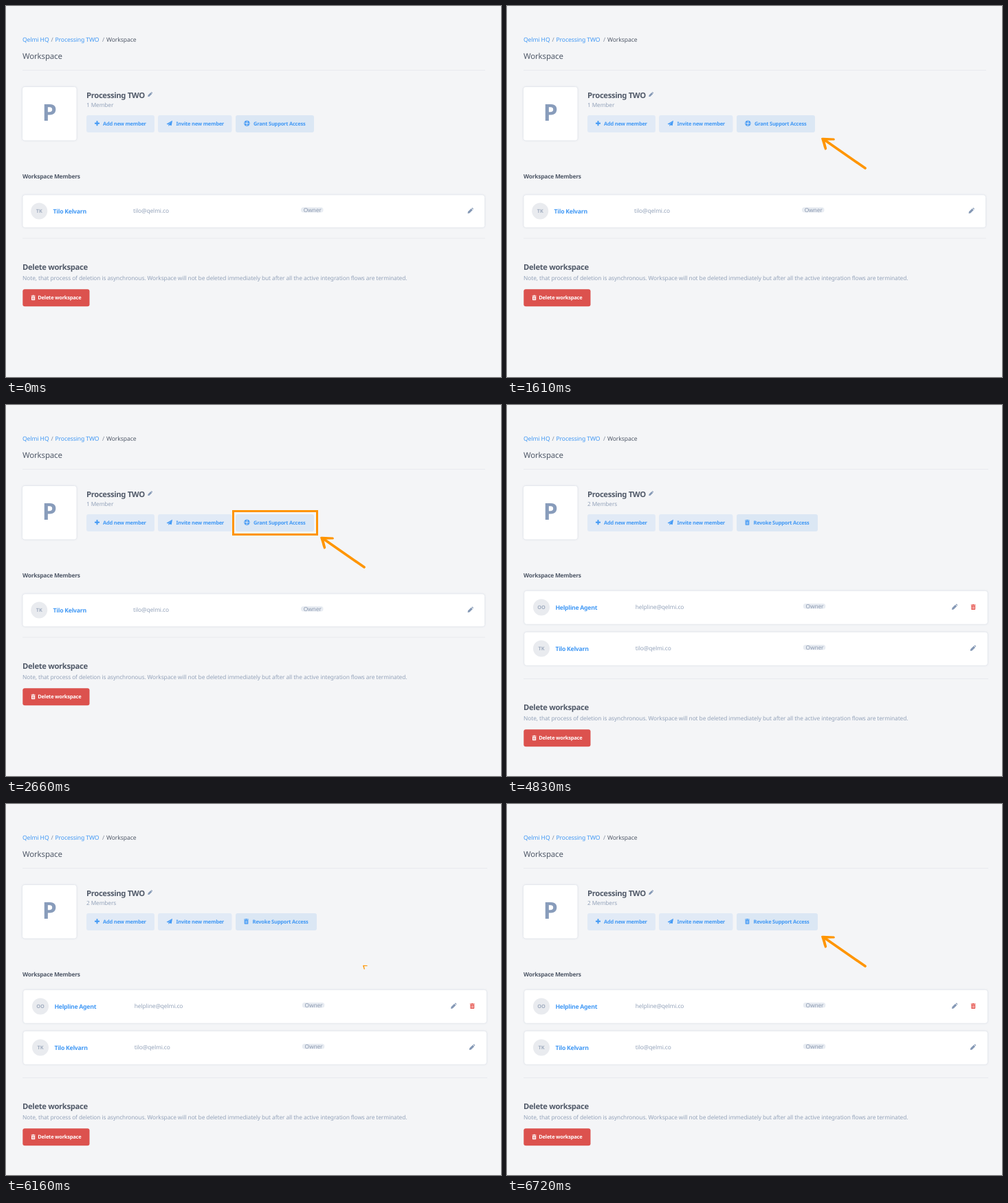
Write an HTML page that moves like this. It is 720 by 540 pixels and loops after 8000 ms.

```html
<!DOCTYPE html>
<html lang="en">
<head>
<meta charset="utf-8">
<title>Workspace settings</title>
<style>
  html, body { margin: 0; width: 100%; height: 100%; overflow: hidden; background: #f4f5f7; }
  svg { display: block; width: 100vw; height: 100vh; }
  text {
    font: 8.4px "Noto Sans", "Open Sans", sans-serif;
    letter-spacing: -.0125em;
    text-rendering: geometricPrecision;
    fill: #515a69;
  }
  .bold { font-weight: 700; letter-spacing: -.03em; }
  .crumb { font-size: 8.6px; }
  .title { font-size: 11.45px; }
  .head { font-size: 11.25px; }
  .sub { font-size: 8.45px; }
  .name { font-size: 8.7px; }
  .btn { font-size: 7.5px; }
  .count { font-size: 8.3px; }
  .note { font-size: 8px; fill: #b4b8bd; }
  .initials { font-size: 7.3px; letter-spacing: 0; text-anchor: middle; fill: #a0acbf; }
  .letter { font-size: 33.6px; letter-spacing: 0; text-anchor: middle; fill: #889cbb; }
  .link { fill: #4299f5; }
  .muted { fill: #94a3ba; }
  .white { fill: #fff; }
  .slash { fill: #818b9b; }
  .card { fill: #fff; stroke: #e6e9ee; filter: drop-shadow(0 0 1px rgba(60, 80, 110, .08)); }
  .rule { stroke: #e8eaee; }
  .soft { fill: #e1eaf6; }
  .support { fill: #dbe7f4; }
  .red { fill: #dc524e; }
  .blue { color: #4299f5; }
  .steel { color: #8498b5; }
  .toast { filter: drop-shadow(0 2px 7px rgba(30, 40, 60, .08)); }
  .mark { fill: none; stroke: #ff9500; stroke-width: 3; }
</style>
</head>
<body>
<svg viewBox="0 0 720 540" preserveAspectRatio="none">
  <defs>
    <g id="pencil" fill="currentColor">
      <path d="M-4 4-3.5 1.3 1.1-3.3 3.3-1.1-1.3 3.5ZM1.7-3.8 2.2-4.2Q2.8-4.6 3.3-4.1L4.1-3.3Q4.6-2.8 4.2-2.2L3.8-1.7Z"/>
    </g>
    <g id="trash" fill="currentColor">
      <path d="M-3.6-3.6H-1.5L-1-4.3H1L1.5-3.6H3.6V-2.6H-3.6Z"/>
      <path fill-rule="evenodd" d="M-3.1-2.1H3.1V3.5Q3.1 4.3 2.3 4.3H-2.3Q-3.1 4.3-3.1 3.5ZM-1.8-1V3.2H-1.2V-1ZM-.3-1V3.2H.3V-1ZM1.2-1V3.2H1.8V-1Z"/>
    </g>
    <g id="ring" fill="none" stroke="currentColor">
      <circle r="3.8" stroke-width=".9"/>
      <circle r="1.8" stroke-width=".8"/>
      <circle r="2.8" stroke-width="1.6" stroke-dasharray="2.6 1.798" transform="rotate(18.4)"/>
    </g>
    <g id="plane" fill="currentColor">
      <path d="M-4.6 1 4.6-4.4 3.2 3.7.3 2.5-1.4 4.5V1.8L3.1-2.6-2.3 1.9Z"/>
    </g>
  </defs>

  <rect width="720" height="540" fill="#f4f5f7"/>

  <text class="crumb link" x="24" y="52">Qelmi HQ</text>
  <text class="crumb slash" x="65.5" y="52">/</text>
  <text class="crumb link" x="71.5" y="52">Processing TWO</text>
  <text class="crumb slash" x="140" y="52">/</text>
  <text class="crumb" x="146" y="52">Workspace</text>
  <text class="title" x="24" y="77">Workspace</text>

  <rect class="card" x="23.5" y="117.5" width="79.5" height="78.5" rx="3.5"/>
  <text class="bold letter" x="63.3" y="167">P</text>
  <text class="bold head" x="117" y="133.7">Processing TWO</text>
  <use class="steel" href="#pencil" transform="translate(209.5 128.8) scale(.82)"/>

  <rect class="soft" x="117" y="159" width="99" height="25" rx="3"/>
  <path d="M129 170.8H136M132.5 167.3V174.3" stroke="#4299f5" stroke-width="2"/>
  <text class="bold btn link" x="141" y="173.8">Add new member</text>
  <rect class="soft" x="221" y="159" width="107.5" height="25" rx="3"/>
  <use class="blue" href="#plane" transform="translate(237.7 170.8) scale(.93)"/>
  <text class="bold btn link" x="247.5" y="173.8">Invite new member</text>

  <text class="bold sub" x="24" y="251">Workspace Members</text>

  <g id="before">
    <path class="rule" d="M24 93.5H697M24 338H697"/>
    <text class="count muted" x="117" y="147">1 Member</text>
    <rect class="support" x="334" y="159" width="114" height="25" rx="3"/>
    <use class="blue" href="#ring" x="350.4" y="170.8"/>
    <text class="bold btn link" x="360" y="173.8">Grant Support Access</text>
    <rect class="card" x="24" y="274.8" width="672.5" height="48" rx="3.5"/>
    <g class="row" transform="translate(0 298.5)" data-row="TK|Tilo Kelvarn|tilo@qelmi.co"></g>
    <use class="steel" href="#pencil" x="675.5" y="298"/>
  </g>

  <g id="after">
    <path class="rule" d="M24 93.5H700M24 398.5H700"/>
    <text class="count muted" x="117" y="147">2 Members</text>
    <rect class="support" x="334" y="159" width="118" height="25" rx="3"/>
    <use class="blue" href="#trash" transform="translate(349.5 170.9) scale(.92)"/>
    <text class="bold btn link" x="358.5" y="173.8">Revoke Support Access</text>
    <rect class="card" x="24.8" y="270.3" width="674.5" height="49" rx="3.5"/>
    <g class="row" transform="translate(1.8 294.5)" data-row="OO|Helpline Agent|helpline@qelmi.co"></g>
    <use class="steel" href="#pencil" x="651" y="294"/>
    <use color="#e5524c" href="#trash" transform="translate(678.2 294) scale(.95)"/>
    <rect class="card" x="24.8" y="330.3" width="674.5" height="49" rx="3.5"/>
    <g class="row" transform="translate(1.8 354.5)" data-row="TK|Tilo Kelvarn|tilo@qelmi.co"></g>
    <use class="steel" href="#pencil" x="677.8" y="354"/>
  </g>

  <g id="danger">
    <text class="bold head" x="24" y="384">Delete workspace</text>
    <text class="muted" x="24" y="398.5">Note, that process of deletion is asynchronous. Workspace will not be deleted immediately but after all the active integration flows are terminated.</text>
    <rect class="red" x="24.3" y="412.3" width="97.2" height="25" rx="3"/>
    <use color="#fff" href="#trash" transform="translate(39.6 424.5) scale(.85)"/>
    <text class="bold btn white" x="46.3" y="427.3">Delete workspace</text>
  </g>

  <g id="toast">
    <rect class="toast" x="459.3" y="36.8" width="255" height="57" rx="2.5" fill="#20252d"/>
    <circle cx="492.3" cy="63.5" r="10.4" fill="#69d671"/>
    <path d="M486.5 63.6 490.8 67.8 498.2 60.3" fill="none" stroke="#20252d" stroke-width="3"/>
    <path d="M525.8 47V81" stroke="#2b3038"/>
    <text class="note" x="541" y="63.6">Helpline Agent has been successfully</text>
    <text class="note" x="541" y="74">added to</text>
    <circle cx="697.5" cy="50.3" r="8" fill="#343a43"/>
    <path d="M695.2 48 699.8 52.6M699.8 48 695.2 52.6" stroke="#4299f5" stroke-width="1.9"/>
  </g>

  <rect id="frame" class="mark" x="330.5" y="154.5" width="122" height="34"/>
  <g id="arrow">
    <line id="shaft" x1="521" y1="236" stroke="#ff9500" stroke-linecap="round"/>
    <path id="tip" fill="#ff9500" d="M0 1.2Q.6-.1 2.5.2L18.6.9Q21 2.2 19 4.1L5.2 4.2 8.2 15.8Q8 18.6 5.2 17.7Q3.5 14 2.6 9.5Z"/>
  </g>
</svg>
<script>
  const LOOP = 8000, STEP = 70;
  const $ = id => document.getElementById(id);
  const show = (id, on) => { $(id).style.display = on ? "" : "none"; };

  for (const row of document.querySelectorAll(".row")) {
    const [initials, name, mail] = row.dataset.row.split("|");
    row.innerHTML = `
      <circle cx="48.2" r="12" fill="#e9ebef"/>
      <text class="bold initials" x="48.2" y="2.6">${initials}</text>
      <text class="bold name link" x="68.6" y="3">${name}</text>
      <text class="muted" x="185" y="2.6">${mail}</text>
      <rect x="429" y="-5.5" width="32.5" height="7.5" rx="3.5" fill="#e8ecf2"/>
      <text x="432.7" y="1" style="fill:#8d9bb1">Owner</text>`;
  }

  // Eased growth from tail to tip, sampled on the step grid
  function growth(t, start, end, rate) {
    const left = Math.max(0, Math.round((end - Math.floor(t / STEP) * STEP) / STEP));
    return t < start ? 0 : (1 - Math.cos(Math.PI * (1 - left * rate))) / 2;
  }

  function drawArrow(p) {
    show("arrow", p > 0);
    const x = 521 - 64 * p, y = 236 - 44.5 * p;
    const size = Math.min(1, .2 + 4.6 * p);
    $("tip").setAttribute("transform", `translate(${x} ${y}) scale(${size})`);
    const shaft = $("shaft");
    shaft.setAttribute("x2", x + 3.5 * size);
    shaft.setAttribute("y2", y + 2.6 * size);
    shaft.setAttribute("stroke-width", 3.7 * size);
    shaft.style.display = p < .1 ? "none" : "";
  }

  function render() {
    const t = performance.now() % LOOP;
    const granted = t >= 3710;
    show("before", !granted);
    show("after", granted);
    show("toast", granted && t < 4830);
    show("frame", t >= 2660 && !granted);
    $("danger").setAttribute("transform", `translate(0 ${granted ? 60 : 0})`);
    drawArrow(granted ? growth(t, 6160, 6720, 1 / 9) : growth(t, 1330, 1610, .18));
    requestAnimationFrame(render);
  }
  render();
</script>
</body>
</html>
```
